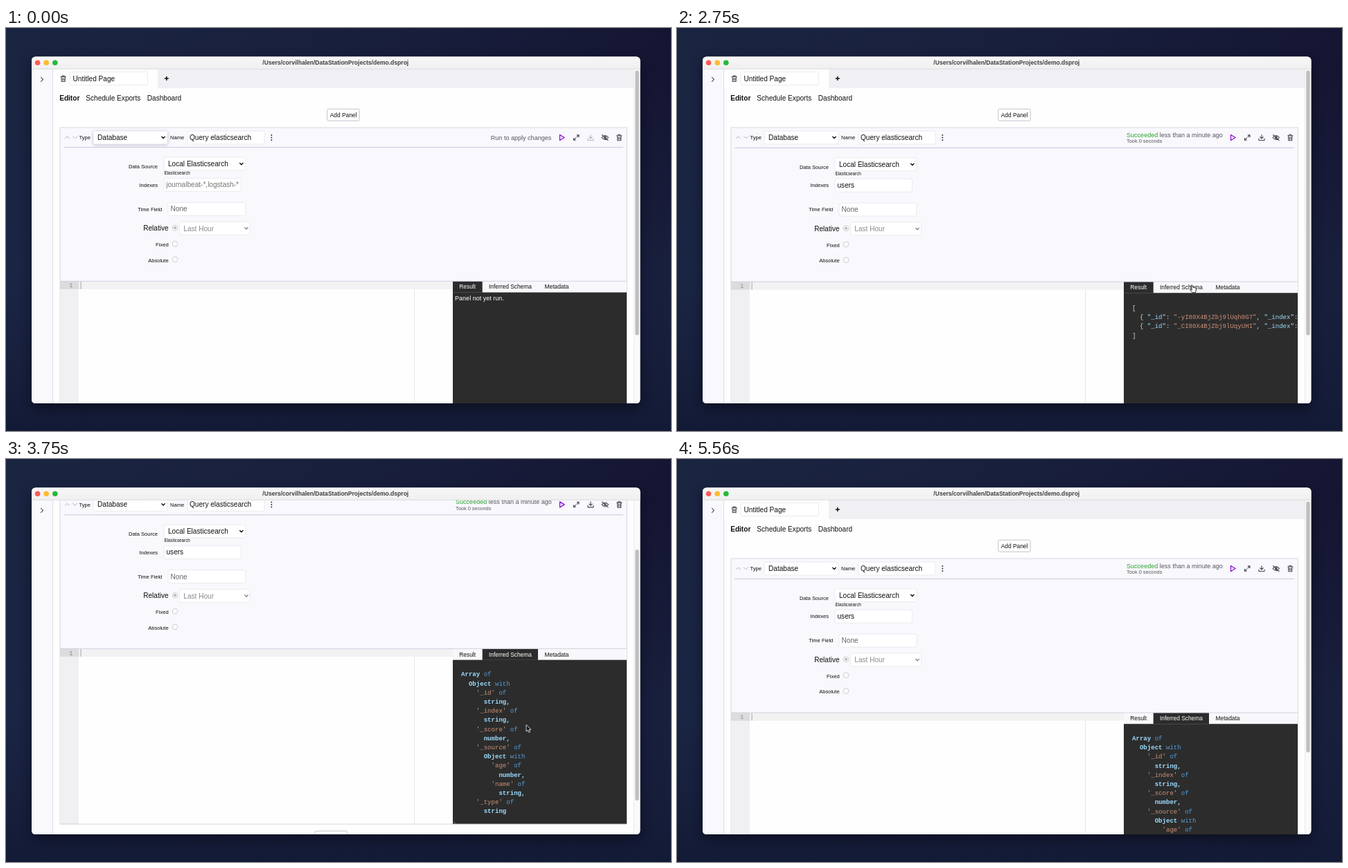
These frames come from a looping animation (960x583 px, 5.62 s). An HTML page:

```html
<!DOCTYPE html>
<html lang="en">
<head>
<meta charset="utf-8">
<title>Query demo</title>
<style>
html, body { margin: 0; width: 100%; height: 100%; overflow: hidden; background: #161d3a; }
svg { display: block; width: 960px; height: 583px; }
text { font-family: "Liberation Sans", Arial, sans-serif; white-space: pre; }
.mono { font-family: "Liberation Mono", "Courier New", monospace; }
.field { fill: #fff; stroke: #e6e6ed; stroke-width: .8; }
.focus { filter: drop-shadow(0 1px 2px rgba(60, 60, 110, .3)); }
.icon { fill: none; stroke: #4b4b55; stroke-width: 1.1; stroke-linecap: round; stroke-linejoin: round; }
</style>
</head>
<body>
<svg id="stage" viewBox="0 0 960 583" xmlns="http://www.w3.org/2000/svg"></svg>
<script>
const LOOP = 5620, STEP = 62.5;
const SMALL = 7.57, BASE = 10.08, NOTE = 9.05, TAB = 8.4;

// Text is placed by the middle of its capitals.
const text = (x, cy, str, size, { fill = '#111', anchor = 'start', weight = 400, id = '', cls = '' } = {}) =>
  `<text xml:space="preserve" id="${id}" class="${cls}" x="${x}" y="${(cy + size * .36).toFixed(2)}" font-size="${size}" fill="${fill}" text-anchor="${anchor}" font-weight="${weight}">${str}</text>`;
const rect = (x, y, w, h, fill, extra = '') =>
  `<rect x="${x}" y="${y}" width="${w}" height="${h}" fill="${fill}" ${extra}/>`;
const field = (x, y, w, id = '') =>
  `<rect id="${id}" class="field" x="${x}" y="${y}" width="${w}" height="19" rx="2.5"/>`;
const line = (x1, y1, x2, y2, stroke, w = 1) =>
  `<path d="M${x1} ${y1}L${x2} ${y2}" stroke="${stroke}" stroke-width="${w}"/>`;
const icon = (x, y, d, extra = '') =>
  `<path class="icon" transform="translate(${x} ${y})" d="${d}" ${extra}/>`;
const group = (id, body, extra = '') => `<g id="${id}" ${extra}>${body}</g>`;
const label = (x, cy, str) => text(x, cy, str, SMALL, { anchor: 'end' });
const chevron = (x, y, color = '#111') =>
  icon(x, y, 'M-2.2 -1.1L0 1.2L2.2 -1.1', `style="stroke:${color};stroke-width:1.4"`);
const button = (x, y) =>
  rect(x, y, 46.5, 17, '#fff', 'rx="1.8" stroke="#bdbdc6" stroke-width=".9"') +
  text(x + 23.3, y + 8.6, 'Add Panel', TAB, { anchor: 'middle' });
const radio = (y, on) =>
  `<circle cx="244" cy="${y}" r="3.9" fill="#fbfbfd" stroke="#c4c4ca" stroke-width=".8"/>` +
  (on ? `<circle cx="244" cy="${y}" r="2.1" fill="#b9b9bf"/>` : '');

const TRASH = 'M-3.6 -2.8H3.6M-1.5 -2.8V-4.2H1.5V-2.8M-2.8 -2.8L-2.4 4.2H2.4L2.8 -2.8M-1 -.8V2.4M1 -.8V2.4';

const mono = (x, cy, body) => text(x, cy, body, 9.07, { fill: '#d4d4d4', cls: 'mono' });
const span = (fill, s, weight = 400) => `<tspan fill="${fill}" font-weight="${weight}">${s}</tspan>`;
const BLUE = '#9cdcfe', ORANGE = '#ce9178', KEYWORD = '#569cd6';

const json = ['[',
  '  { "_id": "-yI80X4BjZbj9lUqh0G7", "_index": "users"',
  '  { "_id": "_CI80X4BjZbj9lUqyUHI", "_index": "users"',
  ']'].map((s, i) => mono(657, 403.9 + i * 13.2,
    s.replace(/"[^"]*"(:?)/g, (m, colon) => span(colon ? BLUE : ORANGE, m)))).join('');

const schema = `Array of
  Object with
    '_id' of
      string,
    '_index' of
      string,
    '_score' of
      number,
    '_source' of
      Object with
        'age' of
          number,
        'name' of
          string,
    '_type' of
      string`.split('\n').map((s, i) => mono(657, 403 + i * 13.19,
    s.replace(/'\w+'|\w+,?/g, m =>
      m[0] === "'" ? span(ORANGE, m) : /^(of|with)$/.test(m) ? span(KEYWORD, m) : span(BLUE, m, 700)))).join('');

const header =
  icon(88.5, 158.3, 'M-3 1.5L0 -1.5L3 1.5', 'style="stroke:#aaaab4;stroke-width:.9"') +
  icon(99.5, 158.3, 'M-3 -1.5L0 1.5L3 -1.5', 'style="stroke:#aaaab4;stroke-width:.9"') +
  text(105.5, 158.4, 'Type', SMALL) +
  field(126, 149, 107, 'typeBox') + text(132, 158.3, 'Database', BASE) + chevron(227, 158.4) +
  text(237, 158.4, 'Name', SMALL) +
  field(262, 149, 111) + text(265, 158.3, 'Query elasticsearch', BASE) +
  [155, 158.5, 162].map(y => `<circle cx="383.3" cy="${y}" r="1" fill="#333"/>`).join('') +
  text(787.3, 158.4, 'Run to apply changes', NOTE, { fill: '#55555e', anchor: 'end', id: 'idle' }) +
  group('done',
    text(649, 154.4, span('#2fa52f', 'Succeeded') + ' less than a minute ago', NOTE, { fill: '#55555e' }) +
    text(649, 163.6, 'Took 0 seconds', 7.4, { fill: '#55555e' })) +
  icon(802.5, 158.5, 'M-3 -4L3.6 0L-3 4Z', 'style="stroke:#8a12cc;stroke-width:1.3"') +
  icon(823.2, 158.5, 'M1 -3.6H3.8V-.8M3.8 -3.6L.8 -.6M-1 3.6H-3.8V.8M-3.8 3.6L-.8 .6') +
  icon(844, 158.5, 'M0 -4V1.4M-2.3 -.8L0 1.5L2.3 -.8M-4 1.5V4H4V1.5', 'id="save"') +
  icon(864.8, 158.5, 'M-4.8 0Q0 -5.8 4.8 0Q0 5.8 -4.8 0ZM-1.4 0a1.4 1.4 0 1 0 2.8 0a1.4 1.4 0 1 0 -2.8 0M-4.3 -4L4.3 4') +
  icon(885.3, 158.5, TRASH);

const form =
  line(83, 172.6, 891, 172.6, '#c9c9de') +
  label(219, 200.6, 'Data Source') + field(228, 187, 118) +
  text(234, 196.4, 'Local Elasticsearch', BASE) + chevron(339.8, 196.5) +
  text(228.4, 209.8, 'Elasticsearch', 6.3) +
  label(219, 226.8, 'Indexes') + field(228, 217.4, 111.5, 'indexBox') +
  text(231.2, 226.5, 'journalbeat-*,logstash-*', BASE, { fill: '#757575', id: 'hint' }) +
  text(231.5, 226.7, '', BASE, { id: 'typed' }) + rect(231.5, 221.4, .9, 11, '#111', 'id="caret"') +
  label(225.3, 262, 'Time Field') + field(234, 252.4, 111.8) +
  text(237.5, 261.8, 'None', BASE, { fill: '#66666c' }) +
  text(234.6, 289.4, 'Relative', BASE, { anchor: 'end' }) + radio(289, true) +
  field(250.5, 280.2, 102) + text(256.3, 289.9, 'Last Hour', BASE, { fill: '#8b8b90' }) + chevron(347, 289.8, '#8b8b90') +
  label(234.6, 313.2, 'Fixed') + radio(312.2) +
  label(234.6, 335.8, 'Absolute') + radio(334.8);

const tabLabel = (x, str, id) => text(x, 374.4, str, TAB, { anchor: 'middle', id });
const editor =
  rect(78, 366.3, 567, 254, '#fefefe') + rect(78, 366.3, 27, 254, '#f0f0f2') +
  rect(105, 366.3, 540, 11.6, '#f2f2f2') + rect(78, 366.3, 27, 11.6, '#dcdcde') +
  line(589.5, 378, 589.5, 620, '#e6e6e8') +
  text(96.5, 372.2, '1', 9.07, { fill: '#8c8c92', anchor: 'end', cls: 'mono' }) +
  rect(107.6, 366.8, 1, 11, '#a6a6a6') +
  rect(645, 366.3, 251, 16.4, '#f8f8fc') +
  rect(645, 382.5, 251, 237.5, '#2c2c2c') + rect(645, 366.3, 42.7, 16.4, '#2c2c2c', 'id="tabBack"') +
  line(78, 366.3, 896, 366.3, '#cfcfdc', .9) +
  tabLabel(666.2, 'Result', 'tabResult') + tabLabel(727.9, 'Inferred Schema', 'tabSchema') +
  tabLabel(795, 'Metadata', 'tabMeta') +
  group('outEmpty', text(648, 390.6, 'Panel not yet run.', NOTE, { fill: '#fff' })) +
  group('outJson', json) + group('outSchema', schema) +
  line(645.5, 616, 649, 619.5, '#8a8a8a', .7) + line(78, 620, 896, 620, '#cfcfdc', .9);

const page =
  rect(68, 59, 839, 28, '#f0f0f4') + rect(68, 59, 151, 28, '#fefefe') +
  icon(82.7, 73.3, TRASH) + field(92, 63.6, 112.5) + text(96.6, 73, 'Untitled Page', BASE) +
  line(228.8, 72.9, 234.8, 72.9, '#111', 1.5) + line(231.8, 69.9, 231.8, 75.9, '#111', 1.5) +
  text(77.2, 101.8, 'Editor', BASE, { weight: 700 }) +
  text(115.3, 101.8, 'Schedule Exports', BASE) + text(203.8, 101.8, 'Dashboard', BASE) +
  button(463.7, 117.2) +
  rect(78, 144, 818.3, 476, '#f8f8fd', 'stroke="#d3d3de" stroke-width=".9"') +
  header + group('lower', form + editor + button(446, 630));

const arrow = `<path d="M0 0V9.6L2.3 7.6L3.9 11L5.6 10.2L4.1 6.9H7Z" fill="#111" stroke="#fff" stroke-width=".8"/>`;
const hand = `<path d="M-1.2 -3.6Q-.4 -4.7 .5 -3.6L1.6 -.4L2.6 -.9L3.8 -.2L5 -.1L6 1.2L5.6 4.6L4.8 6.8H.6L-2.6 3.2Q-3 1.9 -1.6 2L-.2 2.8Z" transform="translate(.5 4)" fill="#fff" stroke="#111" stroke-width=".9" stroke-linejoin="round"/>`;

const stage = document.getElementById('stage');
stage.innerHTML = `
<defs>
  <linearGradient id="sky" x2="1" y2=".35">
    <stop stop-color="#1a2542"/><stop offset=".5" stop-color="#181f3d"/><stop offset="1" stop-color="#141330"/>
  </linearGradient>
  <linearGradient id="dusk" x2="0" y2="1">
    <stop offset=".1" stop-color="#1b2746" stop-opacity="0"/><stop offset=".6" stop-color="#1b2746" stop-opacity=".6"/>
    <stop offset="1" stop-color="#131a36"/>
  </linearGradient>
  <linearGradient id="bar" x2="0" y2="1"><stop stop-color="#f7f7f7"/><stop offset="1" stop-color="#f0f0f0"/></linearGradient>
  <filter id="blur" x="-10%" y="-10%" width="120%" height="125%"><feGaussianBlur stdDeviation="9"/></filter>
  <clipPath id="frame"><rect x="37" y="41.5" width="878.5" height="501.5" rx="5.5"/></clipPath>
  <clipPath id="view"><rect x="68" y="59.5" width="839" height="483.5"/></clipPath>
  <clipPath id="out"><rect x="645" y="382" width="250.6" height="238"/></clipPath>
</defs>
${rect(0, 0, 960, 583, 'url(#sky)')}${rect(0, 0, 960, 583, 'url(#dusk)')}
${rect(37, 48, 878.5, 501, '#000', 'rx="8" opacity=".45" filter="url(#blur)"')}
<g clip-path="url(#frame)">
  ${rect(37, 41, 879, 503, '#fefefe')}
  ${rect(37, 59, 30.5, 484, '#f8f8fd')}${line(67.6, 59, 67.6, 543, '#d8d8e2', .9)}${line(37, 542, 67.6, 542, '#d8d8e2', .8)}
  ${icon(52, 74.3, 'M-1.5 -3L1.5 0L-1.5 3')}
  <g clip-path="url(#view)"><g id="page">${page}</g></g>
  ${rect(906.5, 59, 9, 484, '#fafafa')}${line(906.5, 59, 906.5, 543, '#e6e6e8', .8)}
  ${rect(908.3, 61.5, 5.4, 383, '#bfbfc1', 'id="thumb" rx="2.7"')}
  ${rect(37, 41, 879, 18.2, 'url(#bar)')}${line(37, 59.2, 916, 59.2, '#d6d6d8', .8)}
  ${['#fc5b57', '#fdbb2e', '#25b93a'].map((c, i) => `<circle cx="${45.6 + i * 12.6}" cy="50.2" r="3.8" fill="${c}"/>`).join('')}
  ${text(475.8, 50, '/Users/corvilhalen/DataStationProjects/demo.dsproj', 8.55, { fill: '#3f3f42', anchor: 'middle', weight: 700 })}
</g>
${group('arrow', arrow)}${group('hand', hand)}`;

const $ = id => document.getElementById(id);
const show = (id, on) => $(id).setAttribute('visibility', on ? 'visible' : 'hidden');
const move = (id, x, y) => $(id).setAttribute('transform', `translate(${x} ${y})`);
['outJson', 'outSchema'].forEach(id => $(id).setAttribute('clip-path', 'url(#out)'));

// Rows of [time, value, ...]; values ease between neighbouring rows.
function sample(rows, t) {
  const i = rows.findIndex(r => r[0] > t);
  if (i < 0) return rows[rows.length - 1].slice(1);
  if (i === 0) return rows[0].slice(1);
  const [a, b] = [rows[i - 1], rows[i]];
  const u = (t - a[0]) / (b[0] - a[0]), e = u * u * (3 - 2 * u);
  return a.slice(1).map((v, k) => v + (b[k + 1] - v) * e);
}

const SCROLL = [[3125, 0], [3250, 9.4], [3687, 92.6], [3875, 92.6], [4250, 0]];
const POINTER = [
  [1625, 560, 205], [1812, 755, 168], [1938, 801, 156], [2437, 801, 156],
  [2750, 743, 372], [3000, 743, 372], [3250, 746, 416], [3500, 749, 404], [3750, 751, 384.5],
  [3875, 751, 384.5], [4312, 752, 376.5], [4938, 752, 376.5], [5437, 848, -14]
];
const KEYS = [1250, 1312, 1375, 1437, 1500];
const FOCUS = 312, BLUR = 1937, RUN = 2062, SCHEMA = 2937;

function draw(t) {
  const ran = t >= RUN, schemaOn = t >= SCHEMA, [scroll] = sample(SCROLL, t);
  move('page', 0, -scroll);
  move('lower', 0, ran ? .75 : 0);
  show('idle', !ran);
  show('done', ran);
  $('save').style.stroke = ran ? '' : '#b9b9c1';

  const focused = t >= FOCUS && t < BLUR;
  const word = 'users'.slice(0, KEYS.filter(k => t >= k).length);
  $('typeBox').classList.toggle('focus', t < FOCUS);
  $('indexBox').classList.toggle('focus', focused);
  show('hint', !word);
  $('typed').textContent = word;
  $('caret').setAttribute('x', 231.3 + (word ? $('typed').getComputedTextLength() : 0));
  show('caret', focused && (word || (t - FOCUS) % 1000 < 500));

  show('outEmpty', !ran);
  show('outJson', ran && !schemaOn);
  show('outSchema', schemaOn);
  $('tabBack').setAttribute('x', schemaOn ? 687.7 : 645);
  $('tabBack').setAttribute('width', schemaOn ? 80.3 : 42.7);
  $('tabResult').setAttribute('fill', schemaOn ? '#111' : '#fff');
  $('tabSchema').setAttribute('fill', schemaOn ? '#fff' : '#111');
  $('thumb').setAttribute('y', 61.5 + scroll * .75);
  $('thumb').setAttribute('height', schemaOn ? 363 : 383);

  const [x, y] = sample(POINTER, t);
  const shown = t >= 1625 && t < 5437;
  const tabTop = 366 - scroll;
  const overTab = x < 768 && y >= tabTop && y < tabTop + 17;
  const overRun = Math.abs(x - 802) < 6 && Math.abs(y - 158) < 6;
  const pointing = overTab || overRun;
  move('arrow', x, y);
  move('hand', x, y);
  show('arrow', shown && !pointing);
  show('hand', shown && pointing);
}

const start = performance.now();
function tick() {
  const t = (performance.now() - start) % LOOP;
  draw(Math.floor((t + 5) / STEP) * STEP);
  requestAnimationFrame(tick);
}
tick();
</script>
</body>
</html>
```
